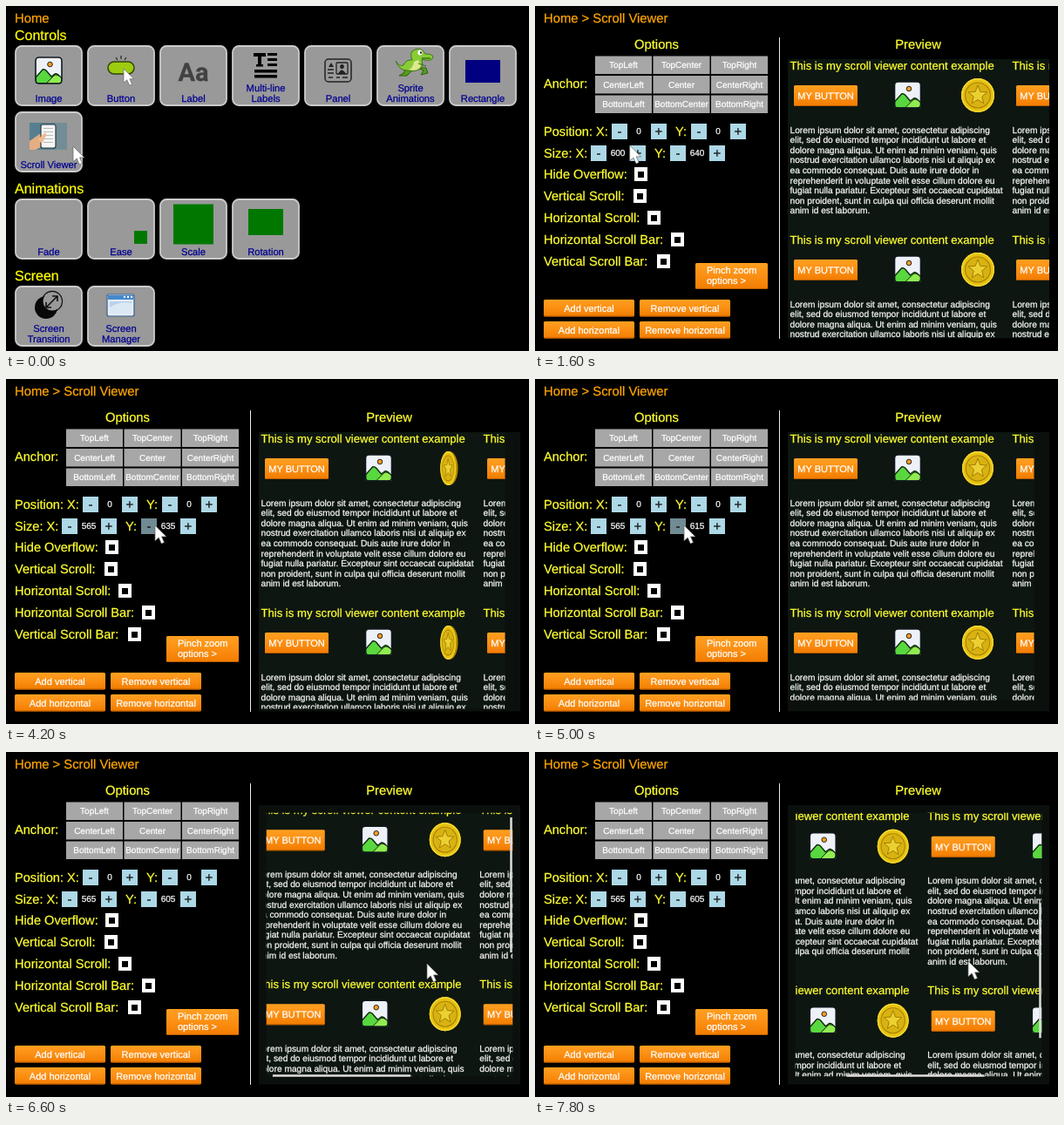
An HTML page with a canvas that plays this animation: 600x396 px, repeating every 8000 ms.

```html
<!DOCTYPE html>
<html lang="en">
<head>
<meta charset="utf-8">
<title>Scroll Viewer demo</title>
<style>
html, body { margin: 0; width: 100%; height: 100%; overflow: hidden; background: #000; }
canvas { display: block; width: 600px; height: 396px; }
</style>
</head>
<body>
<canvas id="stage" width="600" height="396"></canvas>
<script>
const ctx = document.getElementById('stage').getContext('2d');
const LOOP = 8000, STEP = 200, YELLOW = '#ffff30', GREEN = '#007800';
const SANS = '"Liberation Sans", Arial, sans-serif';
ctx.textRendering = 'geometricPrecision';

// ---- drawing helpers
function text(str, x, y, size, color, align = 'left', font = SANS, weight = '') {
  ctx.font = `${weight} ${size}px ${font}`;
  ctx.textAlign = align;
  ctx.fillStyle = ctx.strokeStyle = color;
  ctx.lineWidth = .25;
  ctx.fillText(str, x, y);
  ctx.strokeText(str, x, y); // slightly heavier letters
}
function rect(x, y, w, h, color) {
  ctx.fillStyle = color;
  ctx.fillRect(x, y, w, h);
}
function paint(fill, stroke, width = 1) {
  if (fill) { ctx.fillStyle = fill; ctx.fill(); }
  if (stroke) { ctx.strokeStyle = stroke; ctx.lineWidth = width; ctx.stroke(); }
}
function round(x, y, w, h, r, fill, stroke, width) {
  ctx.beginPath();
  ctx.roundRect(x, y, w, h, r);
  paint(fill, stroke, width);
}
function oval(x, y, rx, ry, fill, stroke, width) {
  ctx.beginPath();
  ctx.ellipse(x, y, rx, ry, 0, 0, Math.PI * 2);
  paint(fill, stroke, width);
}
function shape(d, x, y, fill, stroke, width) {
  ctx.save();
  ctx.translate(x, y);
  const path = new Path2D(d);
  if (fill) { ctx.fillStyle = fill; ctx.fill(path); }
  if (stroke) { ctx.strokeStyle = stroke; ctx.lineWidth = width || 1; ctx.stroke(path); }
  ctx.restore();
}
function clipped(x, y, w, h, draw) {
  ctx.save();
  ctx.beginPath();
  ctx.rect(x, y, w, h);
  ctx.clip();
  draw();
  ctx.restore();
}
// Interpolates rows of [time, ...values].
function track(keys, t) {
  const i = keys.findIndex(k => k[0] > t);
  if (i === 0) return keys[0].slice(1);
  if (i < 0) return keys[keys.length - 1].slice(1);
  const a = keys[i - 1], b = keys[i], p = (t - a[0]) / (b[0] - a[0]);
  return a.slice(1).map((v, n) => v + (b[n + 1] - v) * p);
}

// ---- timing
const cursorKeys = [[0, 77, 161], [600, 77, 161], [1200, 108, 160], [1800, 109, 160], [2400, 71, 168],
  [3600, 71, 168], [4000, 171, 168], [5400, 171, 168], [5800, 174, 90], [6000, 174, 90],
  [6400, 496, 253], [6600, 483, 243], [6800, 455, 195], [7000, 500, 250], [7200, 513, 237],
  [7400, 497, 212], [7600, 484, 196], [7800, 497, 240]];
const scrollKeys = [[6400, 0, 0], [6600, 13, 10.5], [6800, 40, 64], [7000, 57, 118], [7200, 64, 144],
  [7400, 80, 169], [7600, 95, 190], [7800, 106, 203]];
const HOME_END = 600, CENTERED = 6000;
const sizeX = t => 600 - 5 * Math.min(7, Math.max(0, Math.ceil(7 * (t - 2400) / 1200)));
const sizeY = t => 640 - 5 * Math.min(7, Math.max(0, Math.floor((t - 4000) / 200)));
const between = (t, a, b) => t >= a && t <= b;

// ---- shared pictures
function picture(cx, cy) {
  clipped(cx - 15, cy - 15, 30, 30, () => {
    round(cx - 15, cy - 15, 30, 30, 4, '#eef2f8');
    oval(cx + 1.5, cy - 7, 2.8, 2.8, '#ff9d22', '#222', 1);
    shape('M-15 15V8L-7-1Q-5-2-3 0L3 7L7 4Q9 3 11 5L15 9V15Z', cx, cy, '#58d83e', '#10280f', 1.4);
    shape('M-3 15L6 6Q9 3 15 9V15Z', cx, cy, '#91ec50', '#10280f', 1);
  });
  round(cx - 15, cy - 15, 30, 30, 4, null, '#10181e', 1.6);
}
function coin(cx, cy, t) {
  const turn = Math.abs(Math.cos(Math.PI * (t - 1600) / 700));
  const w = Math.max(.15, Math.min(1, 1.15 * turn ** 1.9));
  const edge = 3 * (1 - w);
  oval(cx + edge / 2, cy, 19 * w + edge / 2, 19.5, '#b48a00');
  oval(cx - edge / 2, cy, 19 * w, 19.5, '#e6c011');
  ctx.save();
  ctx.translate(cx - edge / 2, cy);
  ctx.scale(w, 1);
  oval(0, 0, 18.3, 18.8, null, '#f2d832', 1.4);
  oval(0, 0, 14.5, 14.5, '#d9b212', '#a98500', 1.2);
  ctx.beginPath();
  for (let i = 0; i < 10; i++) {
    const r = i % 2 ? 5 : 11.5, a = -Math.PI / 2 + i * Math.PI / 5;
    ctx.lineTo(r * Math.cos(a), r * Math.sin(a));
  }
  ctx.closePath();
  paint('#ecd032', '#a07c00', 1);
  ctx.restore();
}
function cursor(x, y, k = 1.05) {
  ctx.save();
  ctx.translate(x, y);
  ctx.scale(k, k);
  shape('M0 0V17L4 13.4L7 20L10 18.6L7.2 12.3H12.3Z', 0, 0, '#fff', '#666', .7);
  ctx.restore();
}

// ---- home screen
function tile(col, y, label, icon) {
  const x = 10 + 83 * col;
  round(x + 1, y + 1, 76, 68, 7, '#999', '#cbcbcb', 1.8);
  if (icon) icon(x, y);
  const lines = label.split('|');
  lines.forEach((line, i) =>
    text(line, x + 39, y + 64.5 - 12 * (lines.length - 1 - i), 11.2, '#000090', 'center'));
}
function pill(x, y) {
  shape('M35 17L33 14M39 16V12M43 17L45 14', x, y, null, '#222', 1.2);
  round(x + 24, y + 19, 30, 14, 7, '#9ccc10', '#33420a', 1.5);
  cursor(x + 42, y + 27, .95);
}
function lineIcon(x, y) {
  rect(x + 25, y + 9, 14, 4, '#000');
  rect(x + 30, y + 9, 4, 15, '#000');
  rect(x + 28, y + 22, 8, 2.5, '#000');
  for (let i = 0; i < 3; i++) rect(x + 41, y + 9 + 6 * i, 11, 3, '#000');
  for (let i = 0; i < 2; i++) rect(x + 26, y + 28 + 6 * i, 26, 3.5, '#000');
}
function panelIcon(x, y) {
  round(x + 24, y + 16, 30, 26, 4, null, '#222', 1.5);
  round(x + 37, y + 20, 13, 13, 1, null, '#222', 1.3);
  oval(x + 43.5, y + 24.5, 2.3, 2.6, '#222');
  shape('M39 33Q43 24 48 33ZM31 20L34 25H28Z', x, y, '#222');
  shape('M27 28H34M27 32H34M28 37H33M37 37H41M44 37H50', x, y, null, '#222', 1.6);
}
function dino(x, y, t) {
  const s = 2 * Math.sin(t / 90);
  ctx.lineJoin = 'round';
  shape(`M35 24L${31 - s} 32L${26 - s} 35H35L42 28ZM47 26L${54 + s} 29L${51 + s} 34L59 32L57 26Z`, x, y, '#559c1b', '#335f13');
  shape('M22 18Q26 29 35 29Q49 32 53 23L52 16Q64 20 65 13Q64 10 56 10Q52 2 44 5Q37 8 41 17Q34 16 31 23Q26 25 22 18Z', x, y, '#87cc35', '#43741c');
  shape('M43 19Q42 26 37 28Q48 31 51 23L48 17Z', x, y, '#dfe88e');
  shape('M48 21L57 24M52 15H62', x, y, null, '#43741c', 1.3);
  oval(x + 50, y + 8.5, 2.6, 3, '#fff');
  oval(x + 51, y + 8.5, 1, 1.3, '#111');
}
function phoneIcon(x, y) {
  rect(x + 17, y + 13, 43, 31, '#557f90');
  rect(x + 46, y + 13, 14, 31, '#738d97');
  shape('M17 34L30 25L39 31L45 33L41 38L30 41L24 44H17Z', x, y, '#e5ad83');
  round(x + 30, y + 15, 17, 27, 2, '#f5f5f5', '#283940', 1.2);
  for (let i = 0; i < 5; i++) rect(x + 33, y + 19 + 4 * i, 11, 1, '#bbb');
  shape('M27 32L34 25Q37 24 36 28L31 37Z', x, y, '#efba91');
}
function transitionIcon(x, y) {
  oval(x + 43, y + 18, 11.5, 11.5, '#999', '#111', 1.3);
  oval(x + 36, y + 25, 13, 13, '#080808');
  oval(x + 43, y + 18, 10.5, 10.5, '#999');
  shape('M36 25L49 12M43 12H49V18M36 19V25H42', x, y, null, '#111', 1.6);
}
function windowIcon(x, y) {
  round(x + 23, y + 10, 31, 25, 2, '#e5edf5', '#36618e', 1.2);
  rect(x + 24, y + 11, 29, 5, '#4689cc');
  rect(x + 26, y + 18, 25, 14, '#b7d2ec');
  shape('M26 32V25Q38 17 51 20V32Z', x, y, '#dce9f5');
  for (let i = 0; i < 3; i++) rect(x + 42 + 4 * i, y + 12, 2, 2, '#fff');
}
function home(t) {
  const p = t / 1000;
  text('Home', 10, 19, 14.8, '#ffa500');
  text('Controls', 10, 39, 16, '#ff0');
  text('Animations', 10, 215, 16, '#ff0');
  text('Screen', 10, 315, 16, '#ff0');
  tile(0, 45, 'Image', (x, y) => picture(x + 39, y + 29));
  tile(1, 45, 'Button', pill);
  tile(2, 45, 'Label', (x, y) => text('Aa', x + 39, y + 41, 29, '#414141', 'center', 'Roboto, sans-serif', 'bold'));
  tile(3, 45, 'Multi-line|Labels', lineIcon);
  tile(4, 45, 'Panel', panelIcon);
  tile(5, 45, 'Sprite|Animations', (x, y) => dino(x, y, t));
  tile(6, 45, 'Rectangle', (x, y) => rect(x + 19, y + 17, 40, 26, '#000080'));
  tile(0, 121, 'Scroll Viewer', phoneIcon);
  tile(0, 221, 'Fade', (x, y) => {
    ctx.globalAlpha = p;
    rect(x + 19, y + 12, 40, 30, GREEN);
    ctx.globalAlpha = 1;
  });
  tile(1, 221, 'Ease', (x, y) => rect(x + 54 - 44 * p * p, y + 37 - 28 * p * p, 15, 15, GREEN));
  tile(2, 221, 'Scale', (x, y) => {
    const s = 46 * (1 - .7 * p);
    rect(x + 39 - s / 2, y + 29.5 - s / 2, s, s, GREEN);
  });
  tile(3, 221, 'Rotation', (x, y) => {
    ctx.save();
    ctx.translate(x + 39, y + 27);
    ctx.rotate(p * Math.PI);
    rect(-20, -15, 40, 30, GREEN);
    ctx.restore();
  });
  tile(0, 321, 'Screen|Transition', transitionIcon);
  tile(1, 321, 'Screen|Manager', windowIcon);
}

// ---- scroll viewer screen
function orange(x, y, w, h, label) {
  const g = ctx.createLinearGradient(0, y, 0, y + h);
  g.addColorStop(0, '#ff9f20');
  g.addColorStop(.5, '#fb8f13');
  g.addColorStop(1, '#f27c00');
  round(x, y, w, h, 1.5, g);
  rect(x + 1, y + h - 1, w - 2, 1, '#b95d00');
  if (label) text(label, x + w / 2, y + h / 2 + 3.8, 11, '#fff', 'center');
}
function stepper(x, y, value, pressed) {
  rect(x, y, 18, 18, pressed ? '#708b94' : '#add8e6');
  rect(x + 45, y, 18, 18, '#add8e6');
  text('-', x + 9, y + 13.5, 15, '#111', 'center');
  text('+', x + 54, y + 14, 15, '#111', 'center');
  text(value, x + 31, y + 12, 10, '#fff', 'center');
}
function options(t) {
  const label = (str, x, y) => text(str, x, y, 14.6, YELLOW);
  text('Home > Scroll Viewer', 10, 19, 14.8, '#ffa500');
  text('Options', 139.5, 49, 14.8, YELLOW, 'center');
  text('Preview', 439.5, 49, 14.8, YELLOW, 'center');
  rect(280, 36, 1, 346, '#eee');

  label('Anchor:', 10, 94);
  ['Top', 'Center', 'Bottom'].forEach((row, r) => ['Left', 'Center', 'Right'].forEach((col, c) => {
    const name = r === 1 && c === 1 ? 'Center' : row + col;
    const pressed = name === 'Center' && t === 5800;
    const x = 69 + 66.5 * c, y = 57.5 + 22.5 * r;
    rect(x, y, 65, 20.5, pressed ? '#3c4648' : '#a7a7a7');
    text(name, x + 32.5, y + 13.5, 10, pressed ? '#a9edf3' : '#fff', 'center');
  }));

  label('Position: X:', 10, 149);
  label('Y:', 161, 149);
  stepper(88, 135, 0);
  stepper(179, 135, 0);
  label('Size: X:', 10, 174);
  label('Y:', 137, 174);
  stepper(64, 160, sizeX(t), between(t, 2600, 3600));
  stepper(155, 160, sizeY(t), between(t, 4200, 5400));

  [['Hide Overflow:', 114], ['Vertical Scroll:', 113], ['Horizontal Scroll:', 129],
   ['Horizontal Scroll Bar:', 156], ['Vertical Scroll Bar:', 140]].forEach(([name, x], i) => {
    const y = 185 + 25 * i;
    label(name, 10, y + 13);
    rect(x, y, 15, 16, '#fff');
    rect(x + 4, y + 5, 7, 7, '#000');
  });

  orange(184, 295, 83, 30);
  text('Pinch zoom', 197, 307, 11, '#fff');
  text('options >', 197, 319, 11, '#fff');
  orange(10, 337, 104, 19.5, 'Add vertical');
  orange(120, 337, 104, 19.5, 'Remove vertical');
  orange(10, 362, 104, 19.5, 'Add horizontal');
  orange(120, 362, 104, 19.5, 'Remove horizontal');
}

const lorem = [
  'Lorem ipsum dolor sit amet, consectetur adipiscing',
  'elit, sed do eiusmod tempor incididunt ut labore et',
  'dolore magna aliqua. Ut enim ad minim veniam, quis',
  'nostrud exercitation ullamco laboris nisi ut aliquip ex',
  'ea commodo consequat. Duis aute irure dolor in',
  'reprehenderit in voluptate velit esse cillum dolore eu',
  'fugiat nulla pariatur. Excepteur sint occaecat cupidatat',
  'non proident, sunt in culpa qui officia deserunt mollit',
  'anim id est laborum.'];
function card(x, y, t) {
  text('This is my scroll viewer content example', x + 2.5, y + 11.5, 13.1, YELLOW);
  orange(x + 7, y + 30, 73, 24, 'MY BUTTON');
  picture(x + 137.5, y + 41);
  coin(x + 218, y + 41.5, t);
  lorem.forEach((line, i) => text(line, x + 2.5, y + 84.5 + 11.6 * i, 10.2, '#f8f8f8'));
}
function preview(t) {
  const w = sizeX(t) / 2, h = sizeY(t) / 2;
  const centered = t >= CENTERED;
  const x = 290 + (centered ? (300 - w) / 2 : 0);
  const y = 61 + (centered ? (320 - h) / 2 : 0);
  const [sx, sy] = track(scrollKeys, t);
  rect(290, 61, 300, 320.5, '#0b100d');
  rect(x, y, w, h, '#0d1610');
  clipped(x, y, w, h, () => {
    for (let row = 0; row < 3; row++)
      for (let col = 0; col < 2; col++) card(x - sx + 255 * col, y - sy + 200 * row, t);
  });
  if (t > 6400) {
    rect(x + w - 3, y + sy * .51, 2.5, 155, '#ddd');
    rect(x + sx * .555, y + h - 2, 158, 2.5, '#ddd');
  }
}

function frame(now) {
  const t = Math.floor((now % LOOP) / STEP) * STEP;
  rect(0, 0, 600, 396, '#000');
  if (t < HOME_END) {
    home(t);
  } else {
    options(t);
    preview(t);
  }
  cursor(...track(cursorKeys, t));
  requestAnimationFrame(frame);
}
requestAnimationFrame(frame);
</script>
</body>
</html>
```
